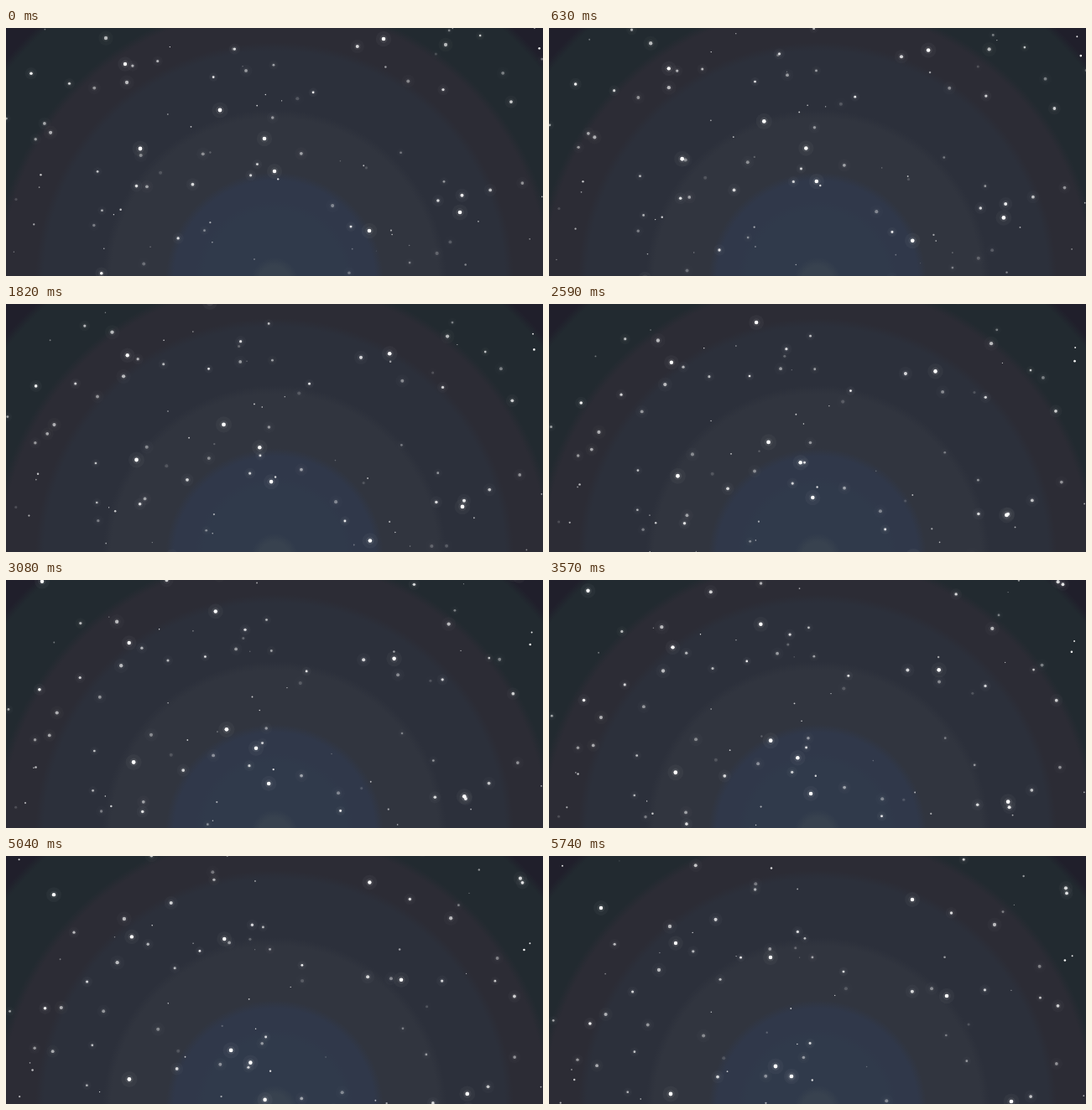
Animation of 640 by 296 pixels, one loop 5.81 s. Source, as an HTML page with a canvas:

```html
<!DOCTYPE html>
<html lang="en">
<head>
<meta charset="utf-8">
<title>Drifting stars</title>
<style>
html, body { margin: 0; width: 100%; height: 100%; overflow: hidden; background: #262b32; }
canvas { display: block; }
</style>
</head>
<body>
<canvas id="sky" width="640" height="296"></canvas>
<script>
const W = 640, H = 296, LOOP = 5810, STEP = 70, HOLD = 140;
const ctx = document.getElementById('sky').getContext('2d');

let seed = 11;
function rand(min, max) {
  seed = seed * 16807 % 2147483647;
  return min + (max - min) * seed / 2147483647;
}

// The most prominent stars: start x, start y, drift x, drift y.
const leaders = [
  [255, 98, 15, 153], [160, 144, -15, 140], [541, 220, 10, 73],
  [433, 242, 3, 135], [450, 13, 24, 154], [308, 132, -19, 131],
  [320, 171, -13, 137], [234, -55, 30, 176], [436, -112, -3, 164],
  [22, -65, 40, 127], [142, 43, 9, 61], [119, 12, 25, 72],
  [144, 65, -13, 71], [524, 20, 7, 62]
].map(([x, y, dx, dy], i) => ({ x, y, dx, dy, r: 2.4 - i * .02, a: i < 11 ? 1 : .65 }));

// The rest fall at random speeds, starting high enough to keep the sky full.
function randomStar() {
  const dy = 60 + 110 * rand(0, 1) ** 2;
  return {
    x: rand(0, W), y: rand(-dy, H), dx: rand(-25, 25), dy,
    r: rand(.6, 2.1), a: rand(.15, 1)
  };
}
const stars = [...leaders, ...Array.from({ length: 110 }, randomStar)];

// Broad rings of nearly flat colour, each given by its outer radius.
const REACH = 440, BLEND = 10;
const backdrop = ctx.createRadialGradient(W / 2, 302, 0, W / 2, 302, REACH);
let inner = 0;
for (const [outer, color] of [
  [28, '#38424f'], [95, '#303a4b'], [130, '#30384a'], [205, '#31353f'],
  [285, '#2c303b'], [335, '#2c2c35'], [415, '#222a30'], [REACH, '#201f2b']
]) {
  backdrop.addColorStop(inner / REACH, color);
  backdrop.addColorStop((outer - BLEND) / REACH, color);
  inner = outer;
}

function disc(x, y, r, alpha) {
  ctx.globalAlpha = alpha;
  ctx.beginPath();
  ctx.arc(x, y, r, 0, 2 * Math.PI);
  ctx.fill();
}

function draw(now) {
  const t = Math.floor(now % LOOP / STEP) * STEP;
  const p = Math.max(0, t - HOLD) / (LOOP - STEP - HOLD);
  ctx.globalAlpha = 1;
  ctx.fillStyle = backdrop;
  ctx.fillRect(0, 0, W, H);
  ctx.fillStyle = '#fff';
  for (const { x, y, dx, dy, r, a } of stars) {
    const px = x + dx * p, py = y + dy * p;
    if (r > 1.3) {
      disc(px, py, r * 4, a * .035);
      disc(px, py, r * 2, a * .08);
    }
    disc(px, py, r, a);
  }
  requestAnimationFrame(draw);
}
requestAnimationFrame(draw);
</script>
</body>
</html>
```
